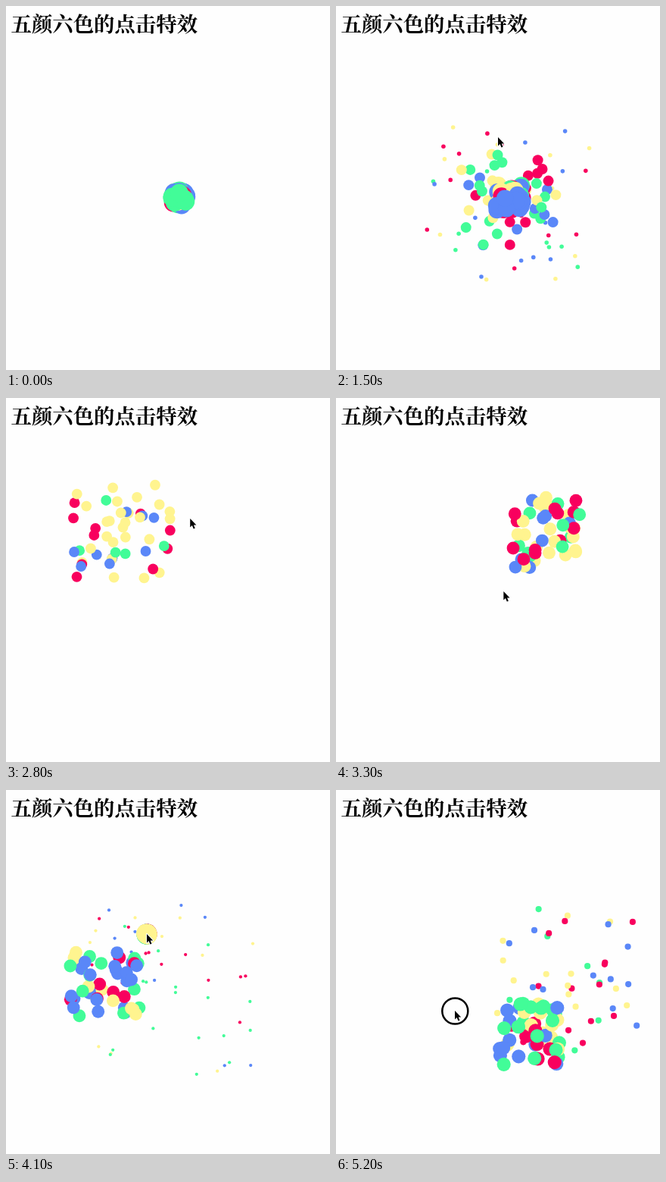
Write an HTML page with a canvas that moves like this. It is 428 px wide and 480 px high and loops after 5300 ms.

```html
<!DOCTYPE html>
<html lang="zh">
<head>
<meta charset="utf-8">
<style>
  html, body { margin: 0; width: 100%; height: 100%; overflow: hidden; background: #fefefe; }
  h1 {
    position: absolute; left: 6.5px; top: 8px; margin: 0;
    font: bold 27.4px/28px "Songti SC", "Noto Serif CJK SC", "Noto Sans CJK SC", "Noto Sans CJK", serif;
    color: #000; white-space: nowrap;
  }
  canvas { position: absolute; left: 0; top: 0; }
</style>
</head>
<body>
<h1>五颜六色的点击特效</h1>
<canvas id="stage" width="428" height="480"></canvas>
<script>
const LOOP = 5300;
const COLORS = ['#f8005e', '#42fc98', '#5a87f8', '#fff48f'];
const COUNT = 50;
const RADIUS = 12.8;
const SHRINK = 0.0145; // px per ms
const SPEED = 0.158;   // px per ms, along each axis
const HOLD = 50;       // ms the pointer rests before and after a stop
const LIFT = 22;       // height of the pointer's arc between stops

// Mouse clicks and the pointer's way in: time and place
const stop = (t, x, y) => ({ t, x, y });
const CLICKS = [
  stop(2395, 153, 178), stop(3000, 281, 177), stop(3365, 218, 264), stop(3800, 131, 255),
  stop(4095, 186, 190), stop(4600, 305, 250), stop(4945, 256, 322), stop(5245, 157, 291)
];
const PATH = [stop(1150, 204, -20), stop(1500, 214, 173), ...CLICKS];

const ctx = document.getElementById('stage').getContext('2d');

function seeded(seed) {
  return () => {
    seed = (seed + 0x6d2b79f5) | 0;
    let n = Math.imul(seed ^ (seed >>> 15), 1 | seed);
    n = (n + Math.imul(n ^ (n >>> 7), 61 | n)) ^ n;
    return ((n ^ (n >>> 14)) >>> 0) / 4294967296;
  };
}

// Each burst scatters evenly over a square; its topmost balls share a colour
function makeBurst({ t, x, y }, i) {
  const rand = seeded(i * 97 + 11);
  const spread = () => (rand() * 2 - 1) * SPEED;
  const balls = Array.from({ length: COUNT }, (_, k) => {
    const pick = k > COUNT - 8 ? i + 1 : Math.floor(rand() * COLORS.length);
    return { vx: spread(), vy: spread(), color: COLORS[pick % COLORS.length] };
  });
  return { born: t, x, y, balls };
}

// Six automatic bursts in the middle, then one per click
const auto = Array.from({ length: 6 }, (_, i) => stop(i * 290 - 60, 229, 253));
const bursts = [...auto, ...CLICKS].map(makeBurst);

function circle(x, y, r) {
  ctx.beginPath();
  ctx.arc(x, y, r, 0, Math.PI * 2);
}

function drawBurst({ born, x, y, balls }, t) {
  const age = t - born;
  const r = RADIUS - SHRINK * age;
  if (age < 0 || r <= 0) return;
  for (const { vx, vy, color } of balls) {
    ctx.fillStyle = color;
    circle(x + vx * age, y + vy * age, r);
    ctx.fill();
  }
}

function pointerAt(t) {
  const next = PATH.findIndex(s => s.t > t);
  if (next === 0) return null;
  if (next < 0) return PATH[PATH.length - 1];
  const a = PATH[next - 1];
  const b = PATH[next];
  const p = Math.min(1, Math.max(0, (t - a.t - HOLD) / (b.t - a.t - 2 * HOLD)));
  return {
    x: a.x + (b.x - a.x) * p,
    y: a.y + (b.y - a.y) * p - LIFT * 4 * p * (1 - p)
  };
}

const arrow = new Path2D('M0 0V11.4L2.6 9L4.5 13.6L6.5 12.7L4.7 8.4H8.2Z');

function drawPointer(t) {
  const pos = pointerAt(t);
  if (!pos) return;
  if (CLICKS.some(c => t >= c.t - HOLD && t < c.t)) {
    ctx.strokeStyle = '#000';
    ctx.lineWidth = 2.5;
    circle(pos.x + 0.3, pos.y + 0.5, 17);
    ctx.stroke();
  }
  ctx.save();
  ctx.translate(pos.x, pos.y);
  ctx.strokeStyle = '#fff';
  ctx.lineWidth = 2;
  ctx.lineJoin = 'round';
  ctx.stroke(arrow);
  ctx.fillStyle = '#000';
  ctx.fill(arrow);
  ctx.restore();
}

const start = performance.now();

function draw(now) {
  const t = Math.max(0, now - start) % LOOP;
  ctx.clearRect(0, 0, 428, 480);
  bursts.forEach(b => drawBurst(b, t));
  drawPointer(t);
  requestAnimationFrame(draw);
}
draw(start);
</script>
</body>
</html>
```
